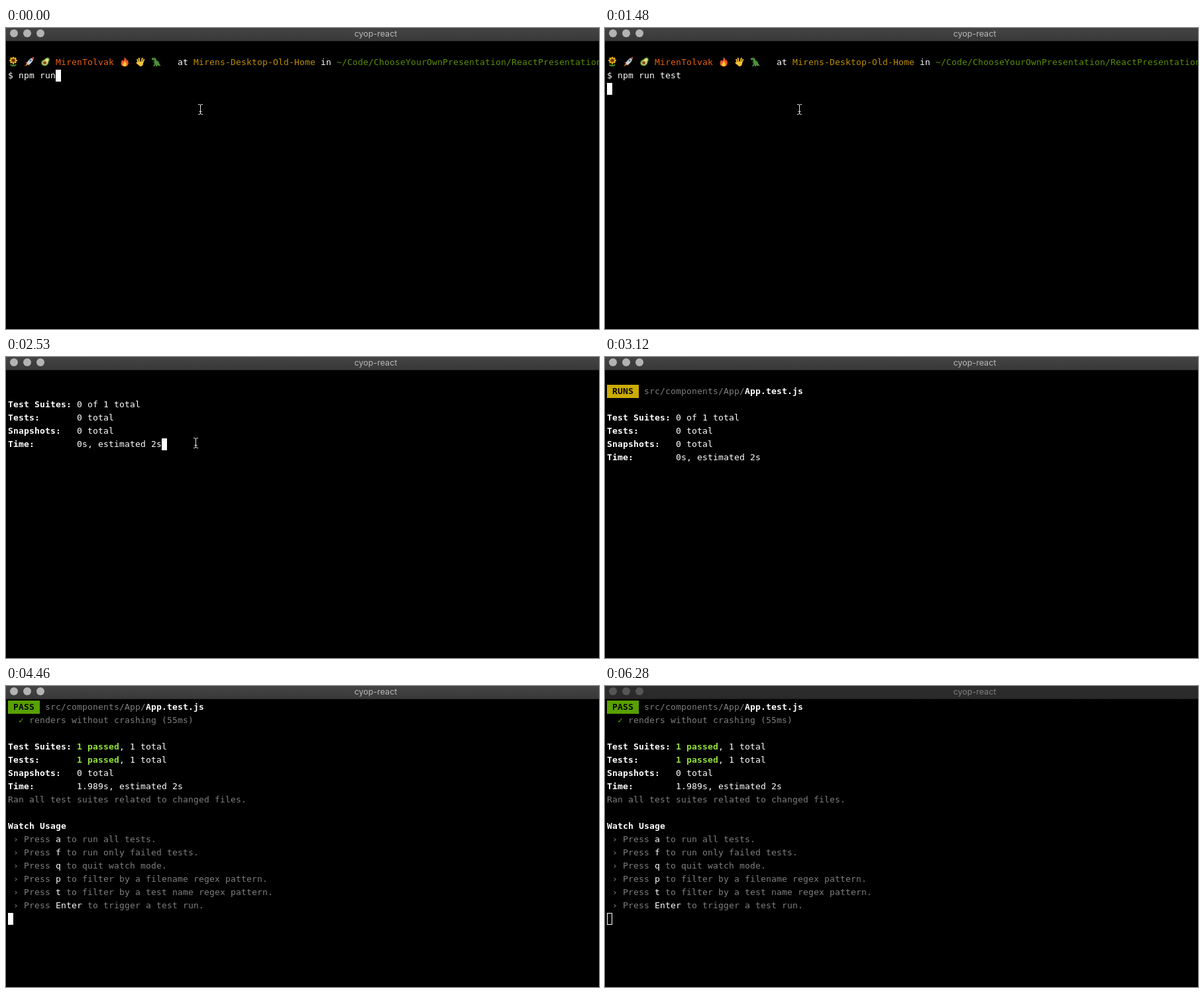
Write an HTML page with a canvas that moves like this. It is 895 by 455 pixels and loops after 6.38 s.

```html
<!DOCTYPE html>
<html lang="en">
<head>
<meta charset="utf-8">
<title>cyop-react</title>
<style>
  html, body { margin: 0; width: 100%; height: 100%; overflow: hidden; background: #000; }
  canvas { display: block; width: 895px; height: 455px; }
</style>
</head>
<body>
<canvas id="stage" width="895" height="455"></canvas>
<script>
const ctx = document.getElementById('stage').getContext('2d');
const LOOP = 6380, LEFT = 3, TOP = 22, CELL = 8, LINE = 20;
const WHITE = '#fff', GRAY = '#7f7f7f', ORANGE = '#ea6010', GOLD = '#bd9000',
      OLIVE = '#5c8f00', GREEN = '#58a000', LIME = '#93e23c', YELLOW = '#ccab00';
const USER = 'MirenTolvak', HOST = 'Mirens-Desktop-Old-Home';
const PROJECT = 'Code/ChooseYourOwnPresentation/ReactPresentation/cyop-react';

// Writes text on the character grid and returns the next free column.
function put(row, col, text, color = WHITE, bold = false) {
  ctx.font = (bold ? 'bold ' : '') + '13px "DejaVu Sans Mono", monospace';
  ctx.fillStyle = color;
  for (const ch of text) ctx.fillText(ch, LEFT + CELL * col++, TOP + LINE * row + 14);
  return col;
}

function cursor(row, col, hollow = false) {
  const x = LEFT + CELL * col, y = TOP + 1 + LINE * row;
  ctx.fillStyle = ctx.strokeStyle = WHITE;
  ctx.lineWidth = 1;
  if (hollow) ctx.strokeRect(x + .5, y + .5, 7, 17);
  else ctx.fillRect(x, y, 8, 18);
}

function badge(row, label, color) {
  ctx.fillStyle = color;
  ctx.fillRect(LEFT, TOP + LINE * row, 48, LINE);
  put(row, 1, label, '#000', true);
  put(row, put(row, 7, 'src/components/App/', GRAY), 'App.test.js', WHITE, true);
}

function blob(x, y, rx, ry, color, turn = 0) {
  ctx.fillStyle = color;
  ctx.beginPath();
  ctx.ellipse(x, y, rx, ry, turn, 0, 7);
  ctx.fill();
}

function shape(path, color) {
  ctx.fillStyle = color;
  ctx.fill(new Path2D(path));
}

function stroke(path, color, width) {
  ctx.strokeStyle = color;
  ctx.lineWidth = width;
  ctx.stroke(new Path2D(path));
}

// Each icon is drawn around the centre of its two-cell slot.
const icons = {
  sunflower() {
    stroke('M0 2V7', '#4d8f1f', 1.5);
    blob(-2.5, 5.5, 2.5, 1, '#4d8f1f', .4);
    blob(2.5, 5.5, 2.5, 1, '#4d8f1f', -.4);
    for (let i = 0; i < 8; i++) {
      const a = i * Math.PI / 4;
      blob(4 * Math.cos(a), -2 + 3.6 * Math.sin(a), 2, 1.5, '#f5b91c', a);
    }
    blob(0, -2, 2.8, 2.6, '#6b3a16');
  },
  rocket() {
    shape('M-3 0L-7 2L-3 2ZM1 3L-1 7L-1 3Z', '#c8372d');
    shape('M-3 2L-7 7L-1 4Z', '#f39a22');
    shape('M7 -7Q1 -6 -4 2L-1 5Q6 1 7 -7Z', '#c9ced3');
    shape('M7 -7L3 -5.5L5.8 -3Z', '#d13c30');
    blob(2, -2, 1.5, 1.5, '#3b6c94');
  },
  avocado() {
    shape('M6 -6Q2 -8 -1 -4Q-7 -2 -6 3Q-4 8 2 6Q6 4 6 0Q8 -4 6 -6Z', '#3f701d');
    shape('M5 -5Q2 -6 0 -3Q-5 -1 -4.5 3Q-3 6 1.5 5Q4.5 3 4.5 0Q6.5 -3 5 -5Z', '#d9e184');
    blob(-.5, 1.5, 2.6, 2.6, '#8b5126');
  },
  fire() {
    shape('M-1 -7Q4 -4 3 -1Q5 -2 4 -4Q7 1 5 5Q3 8 -1 7Q-7 6 -5 0Q-4 -2 -4 -3L-2 -1Q1 -4 -1 -7Z', '#f25b21');
    shape('M0 -1Q4 3 2 6Q0 8 -2 6Q-4 3 -1 2Z', '#ffcf3e');
  },
  salute() {
    stroke('M-3.5 1L-5 -4M-1.2 0L-2.5 -6M1.5 0L3 -6M3.5 1L5.5 -4M-3 4L-6 1', '#f7c436', 1.9);
    shape('M-4.5 0H4.5L3.5 5Q2 7 0 7Q-2 7 -3.5 4Z', '#f7c436');
  },
  dinosaur() {
    shape('M-7 -5Q-5 -7 -2 -6Q0 -5 0 -2Q4 -1 4 2Q5 5 7 6Q3 7 1 5L1 7H-1L-1 4L-3 7H-5L-3 3Q-4 0 -3 -2L-7 -3Z', '#4c9138');
    stroke('M-3 0L-5 1', '#3b762b', 1);
    blob(-3.5, -4.6, .6, .6, '#111');
  }
};

function icon(name, col) {
  ctx.save();
  ctx.translate(LEFT + CELL * (col + 1), 51);
  icons[name]();
  ctx.restore();
}

function titleBar(focused) {
  const fill = ctx.createLinearGradient(0, 0, 0, 19);
  fill.addColorStop(0, focused ? '#444' : '#2d2d2d');
  fill.addColorStop(1, focused ? '#393939' : '#292929');
  ctx.fillStyle = fill;
  ctx.fillRect(0, 0, 895, 19);
  ctx.fillStyle = focused ? '#2b2b2b' : '#1c1c1c';
  ctx.fillRect(0, 19, 895, 1);
  for (const x of [12, 32, 52]) blob(x, 8, 6, 6, focused ? '#b3b3b3' : '#555');
  ctx.font = '12.5px Inter, sans-serif';
  ctx.fillStyle = focused ? '#b8b8b8' : '#808080';
  ctx.textAlign = 'center';
  ctx.fillText('cyop-react', 558, 13);
  ctx.textAlign = 'left';
}

function shell(t) {
  ['sunflower', 'rocket', 'avocado'].forEach((name, i) => icon(name, i * 3));
  put(1, 9, USER, ORANGE);
  ['fire', 'salute', 'dinosaur'].forEach((name, i) => icon(name, 21 + i * 3));
  put(1, 32, 'at');
  put(1, 35, HOST, GOLD);
  put(1, 59, 'in');
  put(1, 62, '~/' + PROJECT, OLIVE);

  const typed = [300, 450, 600, 740, 890].filter(at => t >= at).length;
  const end = put(2, 0, '$ npm run' + ' test'.slice(0, typed));
  if (t < 1480) cursor(2, end);
  else if (t < 1780) cursor(3, 0);
  else {
    put(4, 0, `> cyop-react@0.1.0 test /Users/${USER}/${PROJECT}`);
    put(5, 0, '> react-scripts test');
    cursor(7, 0);
  }
}

function summary(row, values) {
  ['Test Suites:', 'Tests:', 'Snapshots:', 'Time:'].forEach((label, i) => {
    put(row + i, 0, label, WHITE, true);
    const passed = values[i].startsWith('1 passed') ? '1 passed' : '';
    const col = put(row + i, 13, passed, LIME, true);
    put(row + i, col, values[i].slice(passed.length));
  });
}

function running(t) {
  const row = t < 2680 ? 2 : 3;
  if (row === 3) badge(1, 'RUNS', YELLOW);
  const seconds = t < 3570 ? 0 : 1;
  summary(row, ['0 of 1 total', '0 total', '0 total', `${seconds}s, estimated 2s`]);
  if (t < 3120 || (t >= 3720 && t < 4170)) cursor(row + 3, 29);
}

function results(t) {
  badge(0, 'PASS', GREEN);
  put(1, 2, '✓', GREEN);
  put(1, 4, 'renders without crashing (55ms)', GRAY);
  summary(3, ['1 passed, 1 total', '1 passed, 1 total', '0 total', '1.989s, estimated 2s']);
  put(7, 0, 'Ran all test suites related to changed files.', GRAY);
  put(9, 0, 'Watch Usage', WHITE, true);
  [
    ['a', 'run all tests.'],
    ['f', 'run only failed tests.'],
    ['q', 'quit watch mode.'],
    ['p', 'filter by a filename regex pattern.'],
    ['t', 'filter by a test name regex pattern.'],
    ['Enter', 'trigger a test run.']
  ].forEach(([key, action], i) => {
    let col = put(10 + i, 1, '› Press ', GRAY);
    col = put(10 + i, col, key);
    put(10 + i, col, ' to ' + action, GRAY);
  });
  if (t < 5210 || t >= 5810) cursor(16, 0, t >= 6280);
}

// [start time, x, y] of the text pointer
const pointerStops = [
  [0, 293.5, 123], [2230, 287.5, 127], [2380, 286.5, 130],
  [2680, 287.5, 132], [2830, 289.5, 135], [2970, 507.5, 281]
];

function pointer(t) {
  if (t >= 3120) return;
  const [, x, y] = pointerStops.filter(stop => t >= stop[0]).pop();
  ctx.save();
  ctx.translate(x, y);
  stroke('M-3.5 -7.5H-2Q0 -7.5 0 -5.5Q0 -7.5 2 -7.5H3.5M0 -6V6' +
         'M-3.5 7.5H-2Q0 7.5 0 5.5Q0 7.5 2 7.5H3.5M-2 3.5H2', '#e6e6e6', 1);
  ctx.restore();
}

function draw(t) {
  ctx.fillStyle = '#000';
  ctx.fillRect(0, 0, 895, 455);
  titleBar(t < 6280);
  if (t < 2380) shell(t);
  else if (t < 2530) cursor(0, put(0, 0, 'Determining test suites to run...', GRAY, true));
  else if (t < 4460) running(t);
  else results(t);
  pointer(t);
}

const start = performance.now();
function tick() {
  draw((performance.now() - start) % LOOP);
  requestAnimationFrame(tick);
}
tick();
</script>
</body>
</html>
```
